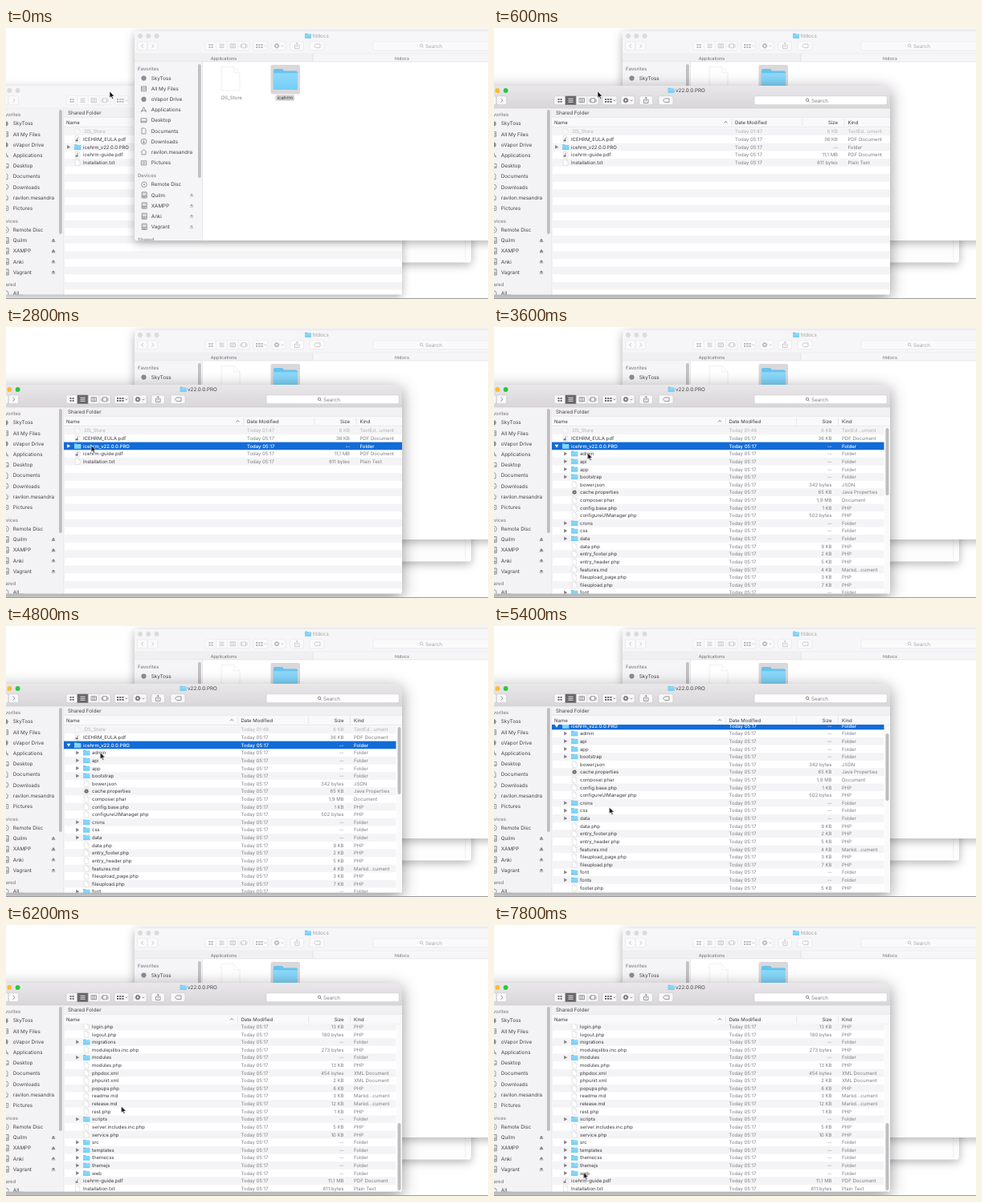
Animation, 600 px wide and 338 px high, one loop 8 s. Source, as an HTML page:

```html
<!DOCTYPE html>
<html lang="en">
<head>
<meta charset="utf-8">
<title>File browser</title>
<style>
html, body { margin: 0; width: 100%; height: 100%; overflow: hidden; background: #fff; }
svg { position: absolute; left: 0; top: 0; width: 100%; height: 100%; }
text { font-family: Inter, Roboto, sans-serif; font-size: 6px; fill: #3a383b; white-space: pre; text-rendering: geometricPrecision; }
.side { font-size: 6.3px; fill: #454346; }
.head { font-weight: 500; fill: #838185; }
.dim { fill: #7f7d80; }
.pale { fill: #a5a3a7; }
.tab { font-size: 5.6px; fill: #6f6d70; }
.hidden text { fill: #b4b2b5; }
.hidden .icon { opacity: .45; }
.selected text { fill: #fff; font-weight: 500; }
.shadow { filter: drop-shadow(0 3px 6px rgba(0, 0, 0, .3)); }
.deep { filter: drop-shadow(0 5px 10px rgba(0, 0, 0, .42)); }

#back { z-index: 0; }
#docs { z-index: 2; }
#share { z-index: 1; animation: raise 8s step-end infinite; }
#top { z-index: 5; }
.idle { animation: idle 8s step-end infinite; }
.active { animation: active 8s step-end infinite; }
.picked { animation: picked 8s step-end infinite; }
.closed { animation: closed 8s step-end infinite; }
.open { animation: open 8s step-end infinite; }
#rows { animation: scroll 8s step-end infinite; }
#thumb { animation: thumb 8s step-end infinite; }
#cursor { animation: cursor 8s step-end infinite; }

@keyframes raise { 0% { z-index: 1 } 7.5%, 100% { z-index: 3 } }
@keyframes idle { 0% { visibility: visible } 7.5%, 100% { visibility: hidden } }
@keyframes active { 0% { visibility: hidden } 7.5%, 100% { visibility: visible } }
@keyframes picked { 0% { visibility: hidden } 20% { visibility: visible } 37.5%, 100% { visibility: hidden } }
@keyframes closed { 0% { visibility: visible } 37.5%, 100% { visibility: hidden } }
@keyframes open { 0% { visibility: hidden } 37.5%, 100% { visibility: visible } }
@keyframes scroll {
  0% { transform: translateY(0) }
  67.5% { transform: translateY(-24px) }
  70% { transform: translateY(-87.6px) }
  72.5% { transform: translateY(-205px) }
  75% { transform: translateY(-308px) }
  77.5%, 100% { transform: translateY(-348.8px) }
}
@keyframes thumb {
  0% { transform: translateY(0) }
  67.5% { transform: translateY(8px) }
  70% { transform: translateY(28px) }
  72.5% { transform: translateY(70px) }
  75% { transform: translateY(107px) }
  77.5%, 100% { transform: translateY(121px) }
}
@keyframes cursor {
  0% { transform: translate(129px, 79px) }
  7.5% { transform: translate(129px, 79px); animation-timing-function: steps(4) }
  17.5% { transform: translate(131px, 94px) }
  20% { transform: translate(133px, 147.5px) }
  32.5% { transform: translate(133px, 147.5px); animation-timing-function: steps(2) }
  37.5% { transform: translate(79px, 147.5px); animation-timing-function: steps(3) }
  45% { transform: translate(116.5px, 157px) }
  60% { transform: translate(117.3px, 157.7px); animation-timing-function: steps(3) }
  67.5% { transform: translate(143.5px, 226px) }
  80% { transform: translate(143.5px, 226px); animation-timing-function: steps(4) }
  90% { transform: translate(111.5px, 307.8px) }
  92.5%, 100% { transform: translate(111.5px, 308.3px) }
}
</style>
</head>
<body>
<svg id="back" viewBox="0 0 600 338">
  <defs>
    <linearGradient id="bar" x2="0" y2="1"><stop stop-color="#e9e7ea"/><stop offset="1" stop-color="#d8d6d9"/></linearGradient>
    <linearGradient id="blue" x2="0" y2="1"><stop stop-color="#8edafb"/><stop offset="1" stop-color="#74cdf5"/></linearGradient>
    <clipPath id="docsClip"><rect x="160" y="4" width="460" height="261" rx="4"/></clipPath>
    <clipPath id="shareClip"><rect x="-40" y="72" width="533" height="261" rx="4"/></clipPath>
    <clipPath id="listClip"><rect x="72" y="123.7" width="421" height="209"/></clipPath>
  </defs>
  <rect class="shadow" x="300" y="60" width="279" height="232.5" rx="3" fill="#fdfdfd"/>
  <path d="M571.8 265V290" stroke="#ececec" stroke-width=".8"/>
</svg>
<svg id="docs" viewBox="0 0 600 338"></svg>
<svg id="share" viewBox="0 0 600 338"></svg>
<svg id="top" viewBox="0 0 600 338">
  <path d="M0 337.5H600" stroke="#9b9b9b"/>
  <path id="cursor" d="M0 0V8.3L1.9 6.6L3.2 9.6L4.6 9L3.3 6.1H5.9Z" fill="#111" stroke="#fff" stroke-width=".6"/>
</svg>

<script>
const ROW = 9.62, FIRST = 129.2;

const rect = (x, y, w, h, fill, extra = '') =>
  `<rect x="${x}" y="${y}" width="${w}" height="${h}" fill="${fill}" ${extra}/>`;
const line = (d, color = '#888', width = .8, fill = 'none') =>
  `<path d="${d}" stroke="${color}" stroke-width="${width}" fill="${fill}"/>`;
const dot = (x, y, r, fill, stroke = 'none') =>
  `<circle cx="${x}" cy="${y}" r="${r}" fill="${fill}" stroke="${stroke}" stroke-width=".8"/>`;
const text = (x, y, s, cls = '', anchor = 'start') =>
  `<text x="${x}" y="${y + 2.2}" class="${cls}" text-anchor="${anchor}">${s}</text>`;
const group = (body, attrs = '') => `<g ${attrs}>${body}</g>`;
const move = (x, y, body) => group(body, `transform="translate(${x} ${y})"`);

const folder = (x, y, w, h) => move(x, y,
  `<path d="M0 ${h * .1}Q0 0 ${w * .06} 0H${w * .36}L${w * .44} ${h * .1}H${w * .95}Q${w} ${h * .1} ${w} ${h * .2}V${h}H0Z" fill="#68c3ee"/>` +
  rect(0, h * .2, w, h * .8, 'url(#blue)', `rx="${w * .03}"`));

const page = (x, y, w, h) => {
  const c = w * .32;
  return move(x, y, line(`M0 0H${w - c}L${w} ${c}V${h}H0ZM${w - c} 0V${c}H${w}`, '#d6d6d6', .6, '#fff'));
};

// Title bar and toolbar, laid out from the window corner at (160, 4).
function chrome(right, title, titleX, search, searchWidth, on) {
  const ink = on ? '#6e6c6f' : '#b9b7ba', edge = on ? '#c6c4c7' : '#e5e3e6';
  const face = on ? '#f8f7f9' : '#fbfafb';
  const button = (x, w) => rect(x, 16.8, w, 11, face, `rx="2" stroke="${edge}" stroke-width=".6"`);
  const lights = on ? ['#fc5b57', '#fdbc2e', '#28c840'] : ['#dcdadd', '#dcdadd', '#dcdadd'];
  let s = rect(133, 4, right - 133, 28.2, on ? 'url(#bar)' : '#f6f5f7');
  s += lights.map((c, i) => dot(167 + i * 10.3, 10, 2.9, c)).join('');
  s += folder(titleX - 9.3, 6.8, 7.8, 6) + text(titleX, 10, title, on ? 'side' : 'side pale');
  s += button(163.5, 12.4) + button(176.3, 12.4);
  s += line('M171 20L168.6 22.3L171 24.6M181.5 20L183.9 22.3L181.5 24.6', ink);
  s += button(248, 55);
  if (on) s += rect(261.5, 16.8, 13.8, 11, '#69676a');
  s += line('M261.5 17V27.6M275.3 17V27.6M289 17V27.6', edge, .6);
  for (const [x, y] of [[252.5, 20], [255.6, 20], [252.5, 23], [255.6, 23]]) s += rect(x, y, 2, 2, ink);
  s += line('M265.5 20.2H271.5M265.5 22.3H271.5M265.5 24.4H271.5', on ? '#fff' : ink);
  s += line('M279 19.8H285.5V24.8H279ZM281.2 20V24.8M283.3 20V24.8', ink, .7);
  s += line('M293.5 19.8H298.5V24.8H293.5ZM292 20.5V24.5M300 20.5V24.5', ink, .7);
  s += button(308, 18) + button(331, 17) + button(354, 16.5) + button(378, 18);
  for (const x of [311, 314.2, 317.4]) s += rect(x, 20, 2.2, 2, ink) + rect(x, 23, 2.2, 2, ink);
  s += line('M321.5 21.6L323 23.1L324.5 21.6M342.5 21.6L344 23.1L345.5 21.6', ink, .7);
  s += `<circle cx="337" cy="22.3" r="2" fill="none" stroke="${ink}" stroke-width="1.5"/>` +
    `<circle cx="337" cy="22.3" r="3" fill="none" stroke="${ink}" stroke-width=".8" stroke-dasharray="1.2 1.15"/>`;
  s += line('M361 21.4H359.5V25.6H365V21.4H363.5M362.2 24V18.4M360.8 19.8L362.2 18.4L363.6 19.8', ink, .7);
  s += line('M383.5 22.3L385.5 20H391V24.6H385.5Z', ink, .7);
  s += rect(search, 16.8, searchWidth, 11, on ? '#fff' : '#fbfafb', `rx="2" stroke="${edge}" stroke-width=".6"`);
  const cx = search + searchWidth / 2 - 12.7;
  s += dot(cx - 4, 21.8, 1.7, 'none', ink) + line(`M${cx - 2.8} 23L${cx - 1.2} 24.6`, ink);
  s += text(cx + 1, 22.5, 'Search', on ? 'side dim' : 'side pale');
  return s + line(`M133 32.2H${right}`, on ? '#bfbdc0' : '#e0dee1', .6);
}

const places = ['SkyToss', 'All My Files', 'oVapor Drive', 'Applications', 'Desktop', 'Documents',
  'Downloads', 'ravilon.mesandra', 'Pictures'];
const devices = ['Remote Disc', 'Quilm', 'XAMPP', 'Anki', 'Vagrant'];
const glyphs = [
  null,
  'M-3 -3H3V3H-3ZM-3 -1H3M-3 1H3',
  null,
  'M-3 3L0 -3.5L3 3M-3.5 1H3.5',
  'M-3.5 -2.5H3.5V2.5H-3.5ZM-3.5 1H3.5',
  'M-2.5 -3.5H1L2.5 -2V3.5H-2.5Z',
  'M0 -2V2M-1.5 .5L0 2L1.5 .5M-3.4 0A3.4 3.4 0 1 1 3.4 0A3.4 3.4 0 1 1 -3.4 0',
  'M-3.5 0L0 -3.5L3.5 0M-2.5 -.5V3H2.5V-.5',
  'M-3.2 -2.2H3.2V3H-3.2ZM-1.2 .4A1.2 1.2 0 1 1 1.2 .4A1.2 1.2 0 1 1 -1.2 .4'
];

function sidebar(eject) {
  const pitch = 13.17, ink = '#858387';
  let s = text(164, 51, 'Favorites', 'head') + text(164, 184, 'Devices', 'head') + text(164, 263.5, 'Shared', 'head');
  places.forEach((name, i) => {
    const y = 62.6 + i * pitch;
    s += glyphs[i] ? move(171.5, y, line(glyphs[i], ink)) : dot(171.5, y, 3.1, '#8f8d91');
    s += text(180.8, y, name, 'side');
  });
  devices.forEach((name, i) => {
    const y = 195.2 + i * pitch;
    s += i ? move(172.2, y, line('M-3 -3.6H3V3.6H-3ZM-3 1H3M-1.7 2.3H1', ink, .8, '#ddd'))
           : dot(172, y, 3.3, 'none', ink) + dot(172, y, .9, ink);
    s += text(180.8, y, name, 'side');
    if (i) s += move(231, y, `<path d="M-2.2 .4L0 -2.2L2.2 .4ZM-2.2 1.1H2.2V1.9H-2.2Z" fill="${eject}"/>`);
  });
  return s + dot(172, 274.5, 3.2, 'none', ink) + text(180.8, 274.5, 'All…', 'side');
}

const kinds = { php: 'PHP', json: 'JSON', md: 'Markd…cument', pdf: 'PDF Document', xml: 'XML Document',
  txt: 'Plain Text', phar: 'Document', properties: 'Java Properties', DS_Store: 'TextEd…ument' };
const inner = `admin,api,app,bootstrap,bower.json:342 bytes,cache.properties:65 KB,composer.phar:1.9 MB,
config.base.php:1 KB,configureUIManager.php:502 bytes,crons,css,data,data.php:9 KB,entry_footer.php:2 KB,
entry_header.php:5 KB,features.md:4 KB,fileupload_page.php:3 KB,fileupload.php:7 KB,font,fonts,footer.php:5 KB,
header.php:15 KB,ICEHRM_EULA.pdf:36 KB,images,include.common.php:1 KB,includes.com.php:676 bytes,
includes.inc.php:6 KB,index.php:38 bytes,install.php:2 KB,js,lib,license.txt:4 KB,locale,login.php:13 KB,
logout.php:180 bytes,migrations,modulejslibs.inc.php:273 bytes,modules,modules.php:13 KB,phpdox.xml:454 bytes,
phpunit.xml:2 KB,popups.php:8 KB,readme.md:3 KB,release.md:12 KB,rest.php:1 KB,scripts,
server.includes.inc.php:5 KB,service.php:10 KB,src,templates,themecss,themejs,web`.split(/,\s*/);
const head = ['.DS_Store:6 KB', 'ICEHRM_EULA.pdf:36 KB', 'icehrm_v22.0.0.PRO'];
const tail = ['icehrm-guide.pdf:11.1 MB', 'Installation.txt:611 bytes'];

function row(entry, i, { depth = 0, shift = 0, selected = false, opened = false, time = '05:17' }) {
  const [name, size] = entry.split(':');
  const y = FIRST + i * ROW, x = 85 + depth * 11, ext = name.split('.').pop();
  let icon;
  if (!size) {
    const d = opened ? 'M-2.4 -1.8H2.4L0 2.2Z' : 'M-1.8 -2.4V2.4L2.2 0Z';
    icon = folder(x, y - 3.2, 8.3, 6.4) +
      move(x - 7, y, `<path d="${d}" fill="${selected ? '#fff' : '#828084'}"/>`);
  } else {
    icon = page(x + 1.2, y - 3.8, 5.8, 7.6);
    if (ext === 'pdf') icon += rect(x + 1.7, y + .3, 3, 2.2, '#777') + rect(x + 3, y - 1.8, 2, 1.4, '#c99');
    if (ext === 'properties') icon += dot(x + 4.1, y, 2.1, '#999', '#333');
  }
  const body = (selected ? rect(72, y - ROW / 2, 421 + shift, ROW, '#126bd8') : '') +
    group(icon, 'class="icon"') + text(x + 11, y, name) +
    text(300 + shift, y, 'Today ' + time, 'dim') +
    text(428 + shift, y, size ? size.replace('.', ',') : '--', 'dim', 'end') +
    text(440.5 + shift, y, size ? kinds[ext] : 'Folder', 'dim');
  const cls = selected ? 'selected' : i === 0 ? 'hidden' : '';
  return group(body, `class="${cls}"`);
}

const stripes = (n, width) => Array.from({ length: Math.ceil(n / 2) }, (_, k) =>
  rect(72, FIRST + (2 * k - .5) * ROW, width, ROW, '#f4f3f5')).join('');

function columns(shift) {
  const caret = 288.5 + shift;
  return text(75, 117.4, 'Name') + line(`M${caret - 1.8} 118.4L${caret} 116.4L${caret + 1.8} 118.4`, '#666', .8) +
    text(300 + shift, 117.4, 'Date Modified') + text(428 + shift, 117.4, 'Size', '', 'end') +
    text(440.5 + shift, 117.4, 'Kind') +
    line([296, 384, 436].map(x => `M${x + shift} 113V122`).join(''), '#dddbde', .6);
}

function docsWindow() {
  const body = rect(160, 4, 460, 261, '#fff') + chrome(620, 'htdocs', 381.5, 457, 153.4, false) +
    rect(160, 32.4, 222, 9.6, '#f0eff1') + rect(382, 32.4, 238, 9.6, '#f6f5f7') +
    line('M160 42H620M382 32.4V42', '#dad8db', .6) +
    text(271, 37.6, 'Applications', 'tab', 'middle') + text(493, 37.6, 'htdocs', 'tab', 'middle') +
    rect(160, 42.3, 84.5, 223, '#f5f4f6') + line('M244.5 42.3V265', '#dddbde', .6) +
    sidebar('#aaa') + rect(239, 45, 3.8, 142, '#c2c0c3', 'rx="1.9"') +
    group(page(268, 48.5, 23, 29.5), 'opacity=".55"') + text(280, 87, '.DS_Store', 'dim', 'middle') +
    rect(329.5, 46, 36.5, 36.5, '#dad8db', 'rx="2"') + folder(332.8, 51, 30.2, 26) +
    rect(335.5, 83.4, 23.5, 7.4, '#d3d1d4', 'rx="1.5"') + text(347.3, 87, 'icehrm', '', 'middle');
  return rect(160, 4, 460, 261, '#fff', 'rx="4" class="shadow"') + group(body, 'clip-path="url(#docsClip)"');
}

function shareWindow() {
  const frame = cls => rect(-40, 72, 533, 261, '#fff', `rx="4" class="${cls}"`);
  const bar = on => move(-173, 68, chrome(666, 'v22.0.0.PRO', 399, 497, 165.4, on));
  const closed = [...head, ...tail].map((e, i) => row(e, i, { time: i ? '05:17' : '01:47' })).join('');
  const shift = -7.5, all = [...head, ...inner, ...tail];
  const open = all.map((e, i) => row(e, i, {
    shift, depth: i > 2 && i < all.length - 2 ? 1 : 0,
    selected: i === 2, opened: i === 2, time: i ? '05:17' : '01:49'
  })).join('');
  const list =
    group(stripes(22, 421) + closed, 'class="closed"') +
    group(row(head[2], 2, { selected: true }), 'class="picked"') +
    group(group(stripes(all.length, 421 + shift) + open, 'id="rows"') +
      rect(486, 123, 7, 211, '#fafafa') +
      rect(487.5, 126, 4, 84, '#bfbdc0', 'rx="2" id="thumb"'), 'class="open"');
  const body = rect(-40, 72, 533, 261, '#fff') +
    group(bar(false), 'class="idle"') + group(bar(true), 'class="active"') +
    rect(-40, 100.4, 112, 233, '#f3f2f4') + line('M72 100.4V333', '#d8d6d9', .6) +
    move(-172, 56.7, sidebar('#777')) + rect(66, 102, 3.8, 155, '#bfbdc0', 'rx="1.9"') +
    rect(72, 100.5, 421, 10.8, '#f1f0f2') + text(77, 106.1, 'Shared Folder', 'side') +
    rect(72, 111.3, 421, 12.2, '#f9f8fa') + line('M72 111.3H493M72 123.5H493', '#dcdadd', .6) +
    group(columns(0), 'class="closed"') + group(columns(shift), 'class="open"') +
    group(list, 'clip-path="url(#listClip)"');
  return group(frame('shadow'), 'class="idle"') + group(frame('deep'), 'class="active"') +
    group(body, 'clip-path="url(#shareClip)"') +
    line('M-1 332.8H490', '#bdbbbe', .6);
}

document.getElementById('docs').innerHTML = docsWindow();
document.getElementById('share').innerHTML = shareWindow();
</script>
</body>
</html>
```
